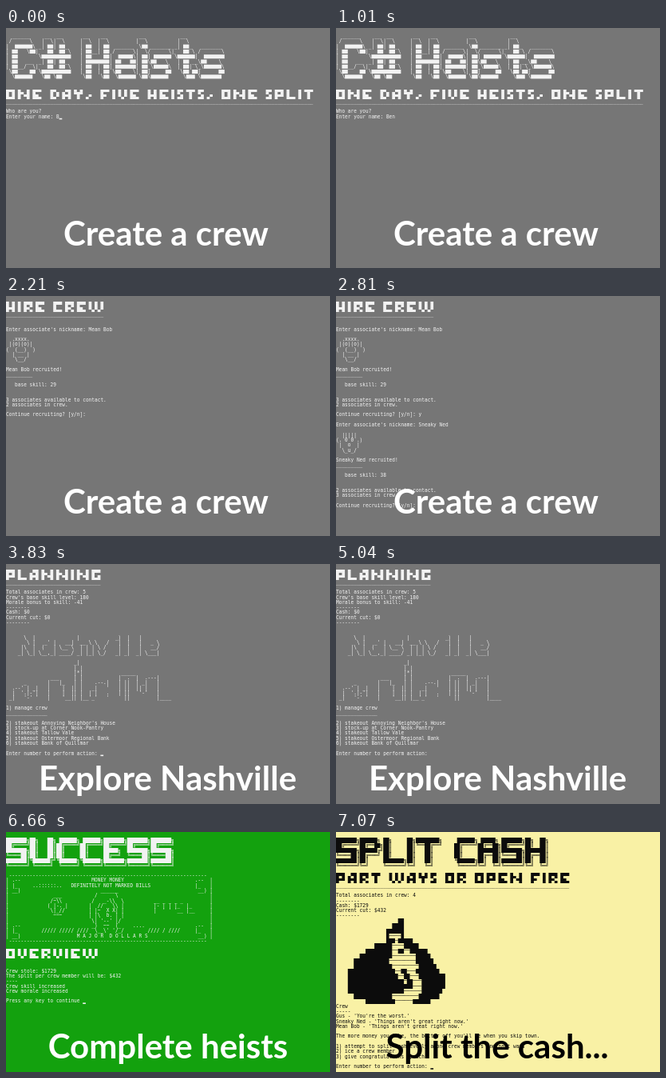
These frames come from a looping animation (406 by 300 pixels, 8000 ms). An HTML page with a canvas:

```html
<!DOCTYPE html>
<html lang="en">
<head>
<meta charset="utf-8">
<title>C# Heists</title>
<style>
html, body { margin: 0; width: 100%; height: 100%; overflow: hidden; background: #767676; }
canvas { display: block; }
</style>
</head>
<body>
<canvas width="406" height="300"></canvas>
<script>
const ctx = document.querySelector('canvas').getContext('2d');
const LOOP = 8000, TOP = 7.4, CELL = 3.7, LINE = 6.29, BASELINE = 4.7;

// Two-row block letters: top/bottom
const SMALL = {
  A: '▄▀█/█▀█', C: '█▀▀/█▄▄', D: '█▀▄/█▄▀', E: '█▀▀/██▄', F: '█▀▀/█▀ ', G: '█▀▀/█▄█',
  H: '█ █/█▀█', I: '█/█', L: '█  /█▄▄', N: '█▄ █/█ ▀█', O: '█▀█/█▄█', P: '█▀█/█▀▀',
  R: '█▀█/█▀▄', S: '█▀/▄█', T: '▀█▀/ █ ', V: '█ █/▀▄▀', W: '█ █ █/▀▄▀▄▀', Y: '█▄█/ █ ',
  ',': '  /▄▀', ' ': ' / '
};
// Six-row letters with a double-line shadow
const LARGE = {
  S: '███████╗/██╔════╝/███████╗/╚════██║/███████║/╚══════╝',
  U: '██╗   ██╗/██║   ██║/██║   ██║/██║   ██║/╚██████╔╝/ ╚═════╝ ',
  C: ' ██████╗/██╔════╝/██║     /██║     /╚██████╗/ ╚═════╝',
  E: '███████╗/██╔════╝/█████╗  /██╔══╝  /███████╗/╚══════╝',
  P: '██████╗ /██╔══██╗/██████╔╝/██╔═══╝ /██║     /╚═╝     ',
  L: '██╗     /██║     /██║     /██║     /███████╗/╚══════╝',
  I: '██╗/██║/██║/██║/██║/╚═╝',
  T: '████████╗/╚══██╔══╝/   ██║   /   ██║   /   ██║   /   ╚═╝   ',
  A: ' █████╗ /██╔══██╗/███████║/██╔══██║/██║  ██║/╚═╝  ╚═╝',
  H: '██╗  ██╗/██║  ██║/███████║/██╔══██║/██║  ██║/╚═╝  ╚═╝',
  ' ': '    /    /    /    /    /    '
};
const banner = (font, word, gap) => {
  const glyphs = [...word].map(c => font[c].split('/'));
  return glyphs[0].map((_, row) => glyphs.map(g => g[row]).join(gap));
};
const small = word => banner(SMALL, word, ' ');
const large = word => banner(LARGE, word, '');
const rule = n => '_'.repeat(n);
const lines = text => text.slice(1).split('\n');
// Builds a line from column, text pairs
const place = (...parts) => {
  let s = '';
  for (let i = 0; i < parts.length; i += 2) s = s.padEnd(parts[i]) + parts[i + 1];
  return s;
};
// Value of the last step that has begun
const step = (t, ...steps) => steps.filter(s => s[0] <= t).pop()[1];

const TITLE = lines(String.raw`
  ______     __  __       __    __           __            __
 /      \   |  \|  \     |  \  |  \         |  \          |  \
|  $$$$$$\ _| $$| $$_    | $$  | $$  ______  \$$ _______ _| $$_   _______
| $$   \$$|   $$  $$ \   | $$__| $$ /      \|  \/      \|   $$ \ /       \
| $$       \$$$$$$$$$$   | $$    $$|  $$$$$\| $$| $$$$$$ \$$$$$$|  $$$$$$$
| $$   __  _| $$| $$_    | $$$$$$$$| $$   $$| $$\$$   \   | $$ __\$$    \
| $$__/  \|   $$  $$ \   | $$  | $$| $$$$$$$| $$_\$$$$$\  | $$| \_\$$$$$$\
 \$$    $$ \$$$$$$$$$$   | $$  | $$ \$$    \| $$|     $$   \$$ $$|      $$
  \$$$$$$   \$$ \$$       \$$   \$$  \$$$$$$ \$$\$$$$$$     \$$$ \$$$$$$$`);

const FIRST = lines(String.raw`

  .xxxx.
 |(o)(o)|
(  (__)  )
  | __ |
   \__/

Mean Bob recruited!
_________

   base skill: 29


3 associates available to contact.
2 associates in crew.
`);

const SECOND = lines(String.raw`

  |||||
(. 0 0 .)
 |  o  |
  \_u_/

Sneaky Ned recruited!
_________

   base skill: 38


2 associates available to contact.
3 associates in crew.

Continue recruiting? [y/n]:`);

const PLAN = lines(String.raw`

Total associates in crew: 5
Crew's base skill level: 180
Morale bonus to skill: -41
--------
Cash: $0
Current cut: $0
--------


      \  |              |            _)  |   |
       \ |   _' |   __|  __ \ \   /   |  |   |   _ \
     |\  |  (   | \__ \  | | | \ /    |  |   |   __/
    _| \_| \__,_| ____/ _| |_| \_/   _| _|  _| \___|

                       _|
                       | |
                       |*|             _____
               ___     | |            |  .  |  .---|
      _       |   |_   | |    .--.|   | ||  | _|   |
  .--' | _|   |    |  || |   _|   '   | ||  || |   |
  |  '.|-'|   |    |  || |  | |   .   | ||   '-'   |
 _|   '-' '   |    '__|| |__'_'   '     ||         |____

1) manage crew
______________

2) stakeout Annoying Neighbor's House
3) stock-up at Corner Nook-Pantry
4) stakeout Tallow Vale
5) stakeout Ostermoor Regional Bank
6) stakeout Bank of Quillmar
`);

const edge = ' ' + '-'.repeat(67);
const bill = (...parts) => place(0, '|', ...parts, 69, '|');
const BILL = [
  edge,
  bill(2, '.--', 29, 'MONEY MONEY', 64, '.--'),
  bill(2, '|_', 9, '..::::::..', 22, 'DEFINITELY NOT MARKED BILLS', 64, '|_'),
  bill(2, '__)', 32, '______', 65, '__)'),
  bill(16, '___', 30, '/      \\'),
  bill(15, '/~\\\\', 29, '/   _-\\\\  \\', 50, '__ _ _ _ _'),
  bill(14, '( |-. |', 28, '|  //   \\\\ |', 50, '|- | | |_  |_'),
  bill(15, '\\|_//', 28, '| |~  X X| |', 50, "|  ' ' '__ |__"),
  bill(16, '~~~', 28, '| |\\  b. | |'),
  bill(29, "\\| '--' |/"),
  bill(2, '.--', 29, '_)  ~~  (_', 43, '....', 64, '.--'),
  bill(2, '|_', 12, '///// ///// ////', 30, "\\__\\' '/_/", 48, '//// / ////', 64, '|_'),
  bill(2, '__)', 24, 'M A J O R  D O L L A R S', 65, '__)'),
  edge
];

const BAG = lines(`
                     ██
                   ████
                 ██████
                 █────█
                 ███─█████
             ██████────█████
          █████████──██──██████
        ███████████────────█████
      ████████████─────────██████
      █████████████─────────██████
    ████████████████──██───████████
    █████████████████──██───█████████
    ███████████████████─██───████████
    ██████████████████████───████████
    ███████████████████──────███████
      █████████████─────────███████
          ██████████──────██████`);

const SPLIT = lines(`
Crew
-----
Gus - 'You're the worst.'
Sneaky Ned - 'Things aren't great right now.'
Mean Bob - 'Things aren't great right now.'

The more money you take, the better off you'll be when you skip town.

1) attempt to split cash evenly among crew members and part ways
2) ice a crew member
3) give congratulations speech

Enter number to perform action: ▁`);

const ASK = "Enter associate's nickname: ";

function intro(t) {
  const name = step(t, [0, 'B▁'], [200, 'Be▁'], [400, 'Ben▁'], [1010, 'Ben']);
  return [...TITLE, '', '', ...small('ONE DAY, FIVE HEISTS, ONE SPLIT'), rule(104), '',
    'Who are you?', 'Enter your name: ' + name];
}

function hire(t) {
  const rows = [...small('HIRE CREW'), rule(33), '', '', ASK + (t < 2000 ? 'M' : 'Mean Bob')];
  if (t >= 2210) rows.push(...FIRST, 'Continue recruiting? [y/n]: ' + (t < 2410 ? '' : 'y'));
  if (t >= 2410) rows.push('', ASK + step(t, [0, 'Sne'], [2610, 'Sneaky N'], [2810, 'Sneaky Ned']));
  if (t >= 2810) rows.push(...SECOND);
  return rows;
}

function plan(t) {
  const cursor = step(t, [0, '▁'], [4030, ''], [4430, '▁'], [5040, '']);
  return [...small('PLANNING'), rule(32), ...PLAN, 'Enter number to perform action: ' + cursor];
}

function success(t) {
  const cursor = step(t, [0, '▁'], [6260, ''], [6470, '▁']);
  return [...large('SUCCESS'), '', ...BILL, '', ...small('OVERVIEW'), '', '',
    'Crew stole: $1729', 'The split per crew member will be: $432', '----',
    'Crew skill increased', 'Crew morale increased', '', 'Press any key to continue ' + cursor];
}

function split() {
  return [...large('SPLIT CASH'), '', ...small('PART WAYS OR OPEN FIRE'), rule(79), '',
    'Total associates in crew: 4', '--------', 'Cash: $1729', 'Current cut: $432', '--------',
    ...BAG, ...SPLIT];
}

const SCENES = [
  { start: 0, rows: intro, caption: 'Create a crew', x: 200.5, y: 272, bg: '#767676' },
  { start: 1810, rows: hire, caption: 'Create a crew', x: 200.5, y: 272, bg: '#767676' },
  { start: 3830, rows: plan, caption: 'Explore Nashville', x: 202.5, y: 283, bg: '#767676' },
  { start: 5240, rows: success, caption: 'Complete heists', x: 203, y: 283, bg: '#13a10e' },
  { start: 7070, rows: split, caption: 'Split the cash...', x: 202, y: 283, bg: '#f9f1a5', dark: true }
];

// Runs of solid characters, with their top and bottom as parts of a line
const SOLID = [
  [/[█▀]+/g, 0, .5],
  [/[█▄]+/g, .5, 1],
  [/▁/g, .75, 1],
  [/\${2,}/g, .1, .9]
];

function drawRow(text, row) {
  const y = TOP + row * LINE;
  for (const [pattern, top, bottom] of SOLID) {
    // Whole pixels only where halves must join without a seam
    const snap = top % .5 || bottom % .5 ? v => v : Math.round;
    const from = snap(y + top * LINE), to = snap(y + bottom * LINE);
    for (const run of text.matchAll(pattern))
      ctx.fillRect(run.index * CELL, from, run[0].length * CELL, to - from);
  }
  // Large type scaled down keeps the fractional letter spacing
  ctx.save();
  ctx.scale(.1, .1);
  const plain = text.replace(/[█▀▄▁]|\${2,}/g, run => ' '.repeat(run.length));
  ctx.fillText(plain, 0, (y + BASELINE) * 10);
  ctx.restore();
}

function draw(now) {
  const t = now % LOOP;
  const scene = SCENES.filter(s => s.start <= t).pop();
  ctx.fillStyle = scene.bg;
  ctx.fillRect(0, 0, 406, 300);
  ctx.fillStyle = scene.dark ? '#0c0c0c' : '#f2f2f2';
  ctx.textAlign = 'left';
  ctx.font = '61.46px "DejaVu Sans Mono", monospace';
  scene.rows(t).forEach(drawRow);
  ctx.fillStyle = scene.dark ? '#000' : '#fff';
  ctx.textAlign = 'center';
  ctx.font = '700 42px Lato, sans-serif';
  ctx.fillText(scene.caption, scene.x, scene.y);
  requestAnimationFrame(draw);
}
requestAnimationFrame(draw);
</script>
</body>
</html>
```
